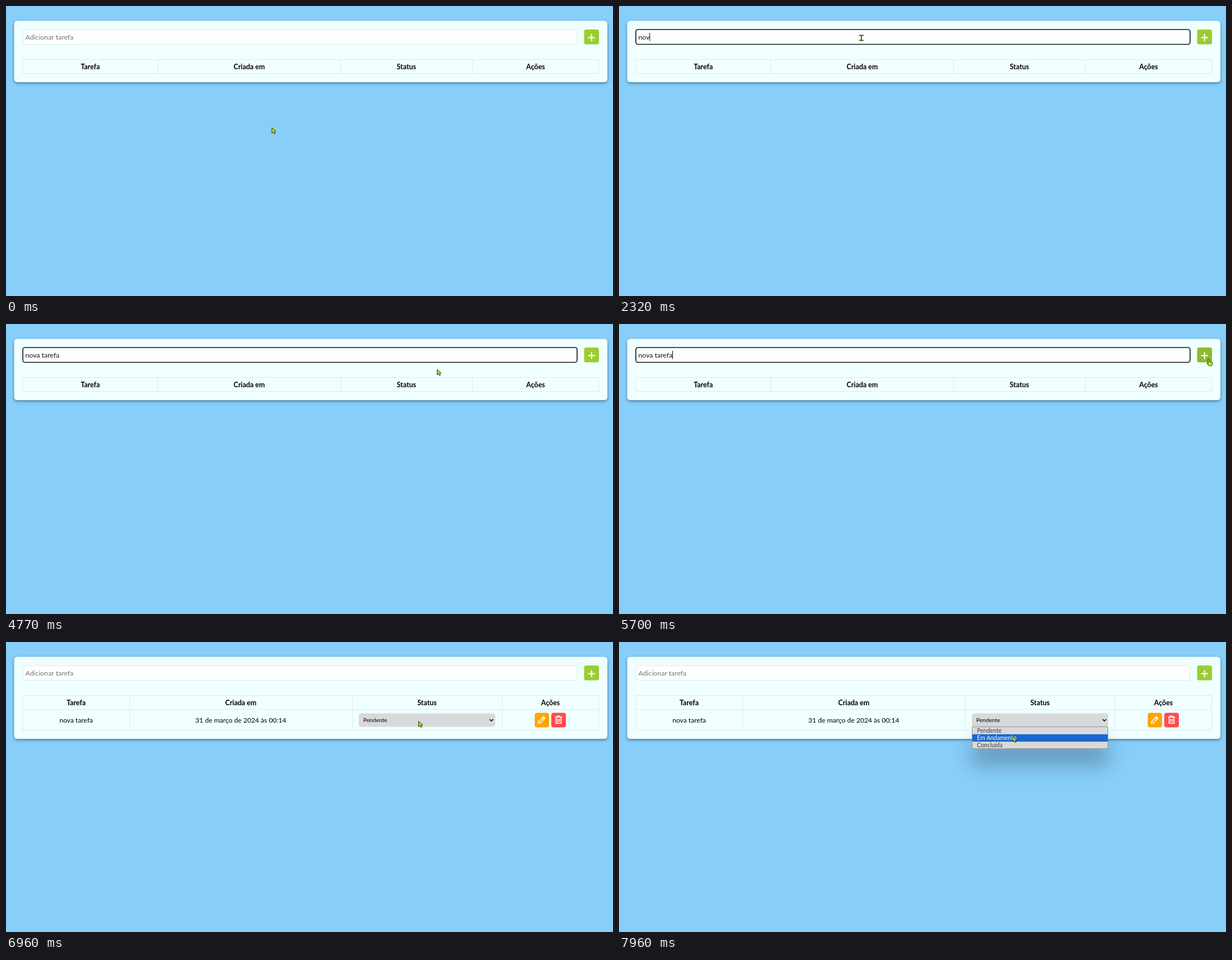
These frames come from a looping animation (1082x518 px, 8000 ms). An HTML page:

```html
<!DOCTYPE html>
<html lang="pt-BR">
<head>
<meta charset="utf-8">
<title>Lista de tarefas</title>
<style>
  html, body { margin: 0; width: 100%; height: 100%; overflow: hidden; background: #87cefa; }
  svg { display: block; }
  text { font: 12.3px Lato, sans-serif; white-space: pre; }
  .head { font-weight: 700; font-size: 12.4px; text-anchor: middle; }
  .cell { font-size: 12.1px; text-anchor: middle; }
  .small { font-size: 10.2px; }
  .option { font-size: 10.5px; fill: #3c3c3c; }
  .grid { fill: none; stroke: #dde9ea; }
  .icon { fill: none; stroke: #fff; stroke-width: 1.6; }
  #card { fill: #f0ffff; filter: drop-shadow(0 2.5px 2.5px rgba(0, 0, 0, .42)); }
  #popup { filter: drop-shadow(0 28px 18px rgba(0, 0, 0, .27)); }
  #pointer path { stroke-linejoin: round; }
</style>
</head>
<body>
<svg width="1082" height="518" viewBox="0 0 1082 518">
  <rect id="card" x="14.5" y="26.5" width="1057.5" rx="5.5"/>

  <rect id="field" x="30" y="42" width="988" height="26.5" rx="4" fill="#fdfefe"/>
  <text id="placeholder" x="34.5" y="59.5" fill="#757575">Adicionar tarefa</text>
  <text id="typed" x="34.5" y="59.5" fill="#111"></text>
  <rect id="caret" y="48" width="1" height="14.5"/>

  <rect id="add" x="1030.5" y="42" width="26.5" height="26.5" rx="3.5"/>
  <path d="M1037.5 56.5h12.5M1043.75 50.2v12.5" stroke="#fff" stroke-width="2.2"/>

  <path id="grid" class="grid"/>
  <text class="head" y="112.8">Tarefa</text>
  <text class="head" y="112.8">Criada em</text>
  <text class="head" y="112.8">Status</text>
  <text class="head" y="112.8">Ações</text>

  <g id="row">
    <text class="cell" x="125" y="143.7">nova tarefa</text>
    <text class="cell" x="418.5" y="143.7">31 de março de 2024 às 00:14</text>
    <rect id="select" x="629" y="127.5" width="243" height="24" rx="4.5"/>
    <text class="small" x="636.8" y="143">Pendente</text>
    <path d="M862 138l3.2 3.2 3.2-3.2" fill="none" stroke="#000" stroke-width="1.6"/>
    <rect x="942.5" y="126.5" width="25.5" height="26" rx="4" fill="#ffa500"/>
    <path class="icon" d="M949 145.2v-2.7l9-9 2.7 2.7-9 9zM956 135.5l2.7 2.7"/>
    <rect x="972" y="126.5" width="26" height="26" rx="4" fill="#ff4d4d"/>
    <path class="icon" d="M978.5 134.3h13M982.5 133.5v-1.3h5v1.3M980.5 134.5v10.7h9v-10.7M983.5 137v6M986.5 137v6"/>
  </g>

  <g id="popup">
    <path d="M629.5 151.5h242v35.5q0 3.5-3.5 3.5h-235q-3.5 0-3.5-3.5z" fill="#d9d9d9" stroke="#8d9296"/>
    <rect id="highlight" x="630" width="241" height="13.2" fill="#1967d2"/>
    <text class="option" x="638" y="161.8">Pendente</text>
    <text class="option" x="638" y="174.7">Em Andamento</text>
    <text class="option" x="638" y="187.9">Concluída</text>
  </g>

  <g id="pointer">
    <path id="arrow" d="M0 .5V10.3L2.4 8 4.1 11.5 5.9 10.7 4.3 7.3 7.2 7z" fill="#c3e312" stroke="#2b3310"/>
    <path id="beam" d="M-4-4.5H4M0-4.5V4.5M-4 4.5H4" fill="none" stroke="#4c5a1c" stroke-width="1.9"/>
    <path id="hand" d="M-.6 1Q.8-.7 2 1L2.9 5 6 5.7Q8 6.3 7.8 8L7.5 10.6 6.2 12.7H1.6L-1.6 8.8Q-2.2 7 -.6 7.2L.6 8z" fill="#b8e80e" stroke="#2b3310"/>
    <circle id="halo" r="9" fill="#ff0" fill-opacity=".5"/>
  </g>
</svg>
<script>
const LOOP = 8000;
const el = Object.fromEntries([...document.querySelectorAll('[id]')].map(e => [e.id, e]));
const heads = [...document.querySelectorAll('.head')];
const options = [...document.querySelectorAll('.option')];

// Each stroke of the mouse is a quadratic curve walked in discrete steps.
const moves = [
  { start: 240, end: 920, steps: 11, path: [[474, 217], [362, 132], [432, 57]] },
  { start: 4510, end: 5040, steps: 9, path: [[432, 57], [900, 100], [1074, 74]] },
  { start: 5300, end: 5700, steps: 6, path: [[1074, 74], [1062, 67], [1050, 62]] },
  { start: 6100, end: 6630, steps: 9, path: [[1050, 62], [950, 95], [770, 111]] },
  { start: 6700, end: 6960, steps: 5, path: [[770, 111], [746, 130], [735.5, 141]] },
  { start: 7620, end: 7960, steps: 6, path: [[735.5, 141], [716, 151], [702, 168]] }
];
const clicks = [1120, 5840, 7420];
const message = 'nova tarefa';
const keyTimes = [2050, 2110, 2320, 2380, 2660, 2780, 3120, 3390, 3640, 3910, 4240];

const between = (v, a, b) => v >= a && v < b;
const show = (node, on) => node.setAttribute('visibility', on ? 'visible' : 'hidden');
const set = (node, attrs) => {
  for (const name in attrs) node.setAttribute(name, attrs[name]);
};

function mouseAt(t) {
  const move = moves.filter(m => t >= m.start).pop();
  if (!move) return moves[0].path[0];
  const { start, end, steps, path: [a, b, c] } = move;
  const interval = (end - start) / (steps - 1);
  const p = Math.min(1, (Math.floor((t - start) / interval + 1e-6) + 1) / steps);
  const u = (1 - Math.cos(Math.PI * p)) / 2;
  return a.map((v, i) => v * (1 - u) ** 2 + 2 * b[i] * u * (1 - u) + c[i] * u * u);
}

function drawTable(hasRow) {
  const columns = hasRow ? [30, 220, 617, 884, 1057] : [30, 270.5, 596.5, 831, 1057];
  const edges = columns.map(x => Math.floor(x) + (x === 30 || x === 1057 ? -.5 : .5));
  const bottom = hasRow ? 157.5 : 121;
  const lines = hasRow ? [95.5, 121, 157.5] : [95.5, 121];
  const across = lines.map(y => `M29.5 ${Math.floor(y) - .5 + (y % 1 ? 1 : 0)}H1057`);
  const down = edges.map(x => `M${x} 95.5V${bottom}`);
  el.grid.setAttribute('d', across.concat(down).join(''));
  heads.forEach((h, i) => h.setAttribute('x', (columns[i] + columns[i + 1]) / 2));
  el.card.setAttribute('height', hasRow ? 146.5 : 109.5);
  show(el.row, hasRow);
}

function draw(t) {
  const [x, y] = mouseAt(t);
  const focused = between(t, 1120, 5840);
  const hasRow = t >= 5970;
  const isOpen = t >= 7420;
  const typedCount = focused ? keyTimes.filter(k => t >= k).length : 0;
  const text = t < 5970 ? message.slice(0, keyTimes.filter(k => t >= k).length) : '';

  drawTable(hasRow);

  set(el.field, { stroke: focused ? '#111' : '#dfe8e9', 'stroke-width': focused ? 1.6 : 1 });
  show(el.placeholder, !text);
  el.typed.textContent = text;
  el.caret.setAttribute('x', 34.3 + (typedCount ? el.typed.getComputedTextLength() : 0));
  show(el.caret, between(t, 1120, 1650) || between(t, 2050, 4770) || between(t, 5300, 5840));

  const overField = between(x, 30, 1018) && between(y, 42, 68.5);
  const overAdd = between(x, 1030.5, 1057) && between(y, 42, 68.5);
  const overSelect = between(x, 629, 872) && between(y, 127.5, 151.5);
  el.add.setAttribute('fill', overAdd ? '#8bbb2e' : '#9acd32');
  el.select.setAttribute('fill', overSelect || isOpen ? '#d9d9d9' : '#efefef');

  const active = y > 165 ? 1 : 0;
  show(el.popup, isOpen);
  el.highlight.setAttribute('y', 152 + 12.8 * active);
  options.forEach((o, i) => { o.style.fill = i === active ? '#fff' : ''; });

  el.pointer.setAttribute('transform', `translate(${x} ${y})`);
  show(el.beam, overField);
  show(el.hand, overAdd);
  show(el.arrow, !overField && !overAdd);
  show(el.halo, clicks.some(c => between(t, c, c + 130)));
}

const origin = performance.now();
function tick() {
  draw((performance.now() - origin) % LOOP);
  requestAnimationFrame(tick);
}
tick();
</script>
</body>
</html>
```
